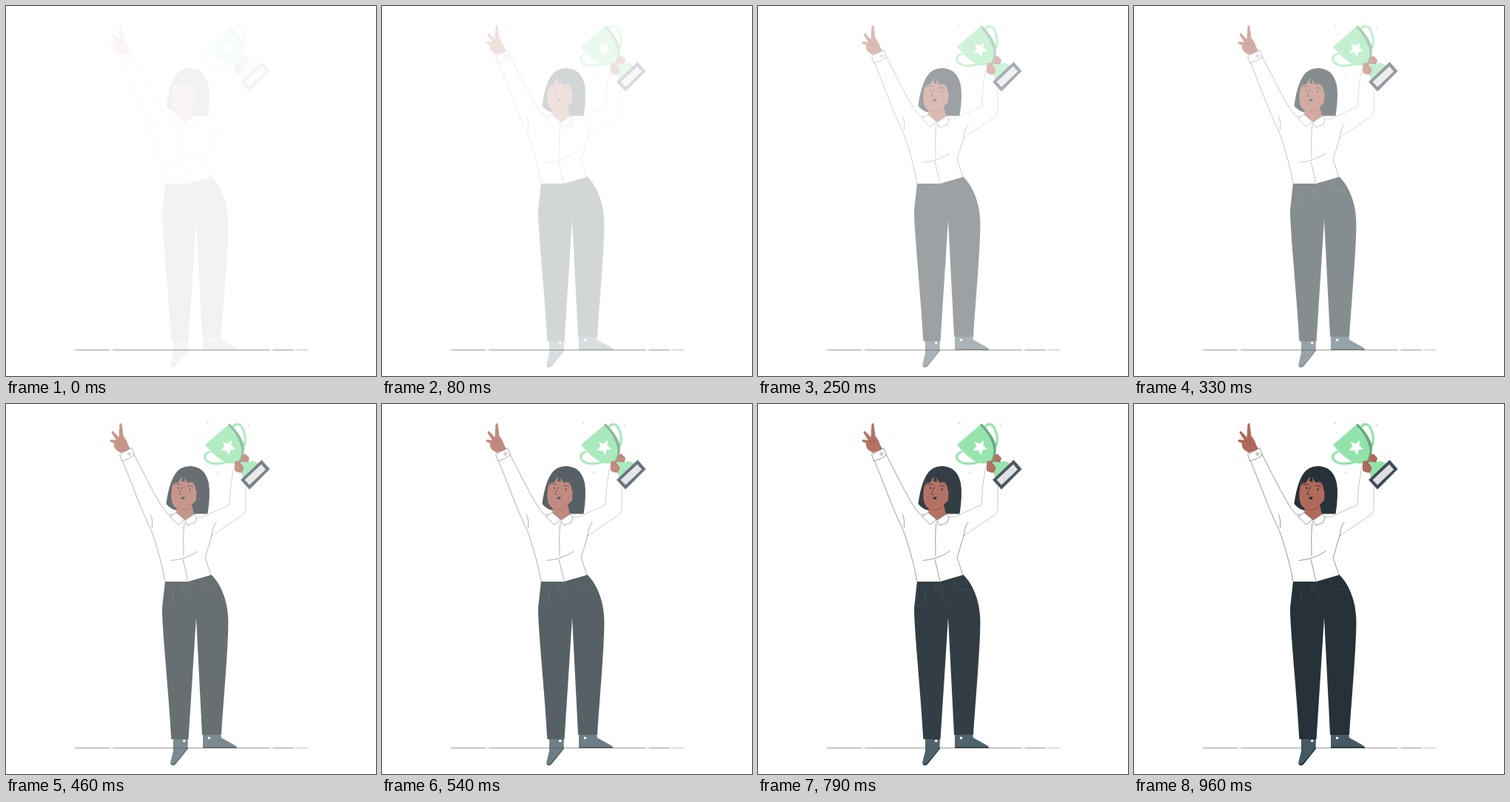
Animation, 500 px wide and 500 px high, one loop 1040 ms. Source, as an HTML page:

```html
<!DOCTYPE html>
<html lang="en">
<head>
<meta charset="utf-8">
<title>Winner with trophy</title>
<style>
  html, body { margin: 0; width: 100%; height: 100%; overflow: hidden; background: #fff; }
  svg { display: block; width: 100vw; height: 100vh; }
  .ink { fill: #263238; }
  .skin { fill: #b0695a; }
  .shade { fill: #94513f; }
  .shoe { fill: #455a64; }
  .mint { fill: #92e3a9; }
  .white { fill: #fff; }
  .line { fill: none; stroke: #263238; stroke-width: .5; stroke-linecap: round; stroke-linejoin: round; }
  .thin { stroke-width: .3; }
  .filled { fill: #fff; }
  .seam { fill: none; stroke: #455a64; stroke-width: .6; }
  .handle { fill: none; stroke: #92e3a9; stroke-width: 3.3; stroke-linecap: round; }
</style>
</head>
<body>
<svg viewBox="0 0 500 500">
  <path fill="#a8a8a8" d="M90 464.800 96 464.200H140.500V465.400H96ZM141 464.800 147 464.200H357V465.400H147ZM358.500 464.700 362 464.200H388L391 464.700 388 465.400H362ZM392 464.500H408V465.200H392Z"/>
  <g id="figure">
    <!-- shoes -->
    <path class="shoe" d="M226 451H246L245.500 465 241 472 228 487Q224 490 222 485L226 469Z"/>
    <path class="ink" d="M245.800 463V466L229 487Q225 490 222 486.500Q226 487 229 484L241 470Z"/>
    <path class="line" d="M228 467 232 468M227 472 231 473M226 477 229 478"/>
    <path class="shoe" d="M266 446H290L291 451 309 461Q312 463 312.500 465H266Z"/>
    <path class="ink" d="M266 463.200H311L312.500 465H266Z"/>
    <path class="line" d="M289 453 286 456M294 455 291 458M298 458 295 460"/>
    <circle class="white" cx="240.700" cy="455.300" r="1.700"/>
    <circle class="white" cx="274.500" cy="451.300" r="1.700"/>

    <!-- trousers -->
    <path class="ink" d="M215 239.500H246L277 230.500C289 241 299.500 264 300.300 290C301 322 294 400 291 447H265L257 289 246.500 453H223.500C220 390 211 304 211 276Z"/>
    <path class="seam" d="M227 250Q228 268 215 272M264 238Q271 250 284 252"/>
    <path class="seam" stroke-dasharray="2 1.500" d="M246 241Q249 258 253.500 272"/>
    <circle class="seam" cx="241" cy="247.500" r="2.800"/>

    <!-- raised hand -->
    <path class="skin" d="M155 66 149 62Q145 58 146 53L141 51Q139.500 48.500 142.500 48L149 49 143 39.500Q142 36 145 37L152.500 45 153.500 28Q154.500 24.500 156.500 27L158.500 43Q164 50 164.500 54L168 61Z"/>
    <path class="line" stroke-opacity=".5" d="M149 49 155 53M155 47Q158 50 157 53"/>

    <!-- shirt -->
    <path class="white" d="M154 69 172 60 190 99 218 148 230 147 243 157 258 153 302 136 308 82 324 93V140Q324 148 318 151L278 178 269 208 277 231 246 240H215C211 216 202 186 196 170C182 142 171 106 154 69Z"/>
    <path class="line" d="M215 240C211 216 202 186 196 170C182 142 169 104 157 76M172 66 190 101Q208 137 217 147Q220 151 224 150M278 178 269 208 277 231M278 178Q279 166 284 160M196 150Q199 158 197.500 167"/>
    <path class="line thin" d="M258 153 265 153 302 136 304 108 308 84M324 108V140Q324 148 318 151L278 178"/>
    <path class="line" d="M241 160C239 178 240 190 240 205M239 210 246 239M223 211.500Q243 210 259 199"/>
    <path class="line filled" d="M154 68 170 59.500 173.500 69Q166 75 157 77Z"/>
    <circle class="line" cx="166.700" cy="67.500" r="1.700"/>

    <!-- hair, neck and collar -->
    <path class="ink" d="M216.500 135C218.500 120 222 104 229 94Q236 84 248 84C263 84 271 93 274 107Q276.500 123 272.500 148.500H249L231 144Q222 142 216.500 135Z"/>
    <path class="skin" d="M231 139 251 136 254 149 242 157 230 147Z"/>
    <path class="line filled" d="M222 152 230 146.500 241 156 233 163ZM242 157 254 149 258 153 256 160 246 164Z"/>

    <!-- face -->
    <path class="skin" d="M226 105Q222 121 224 131Q226 141 236 143Q246 143 254 133Q259 130 258.500 121Q258 116 256 116L257 98 233 96Z"/>
    <path class="shade" d="M231 142Q243 144 250 138.500Q244 146.500 231 142Z"/>
    <path class="ink" d="M225.500 111Q226 97 238 90Q258 89 260 111Q261 124 257 130L257.500 116 252.500 104 252.500 108 249 104 249 106.500Q244 107 241 99L241.500 106 237 104 238 97 232 107 229.500 106Z"/>
    <path class="line" style="stroke-width:.8" d="M229.500 109.500Q232 107 236 108.500M245.500 110.500Q249 109 252.500 112M238.500 112 234 121.500 237.500 122.500"/>
    <circle class="ink" cx="233" cy="113.600" r="1.200"/>
    <circle class="ink" cx="248.300" cy="115.500" r="1.200"/>
    <path class="ink" d="M236 127Q239 124 242 126.500Q241 129.500 237.500 129Z"/>

    <!-- trophy -->
    <path class="handle" d="M275 65Q267 67 269 74Q275 84.500 299 78.500M306 32Q312 24 318 30Q326 43 322 56"/>
    <path class="mint" d="M269 55 301.500 27Q318 42 321 55Q323 68 317.500 78Q309 82 298 79.500Q283 73 269 55Z"/>
    <path fill="#67a47c" d="M300 28 302.500 26.500Q318 42 321.500 55Q323 68 317.500 78L313 79.500Q320 69 318 59Q315 44 300 28Z"/>
    <path id="star" class="white"/>
    <path class="skin" d="M309 82 310 77 318 77 319 70 323 67 326 70Q330 72 328 76L327 84 320 92Q314 94 309 90Z"/>
    <path class="mint" d="M316 80 322 76Q325 81 332 77Q339 78 341 82L322 101Q317 95 320 90Q323 84 316 80Z"/>
    <path class="skin" d="M309 80 315 78 321 87 319 93 310 90ZM318 72 325 68.500 329 74 326 78 320 78Z"/>
    <path class="line" stroke-opacity=".5" d="M315 79 321 87M320 78 326 78"/>
    <path fill="#3e4c58" d="M317 102.500 345.500 75.500 356.500 88 329 115.500Z"/>
    <path fill="#e0e0e0" d="M322.500 102.500 345 81.500 351 88.500 329 109.500Z"/>
    <g id="dots" fill="#dedede"></g>
  </g>
</svg>
<script>
  const LOOP = 1040, FPS = 24, STEPS = 23;
  const $ = id => document.getElementById(id);

  // five-pointed star, tilted with the cup
  const star = Array.from({ length: 10 }, (_, i) => {
    const r = i % 2 ? 5 : 10.5, a = (i * 36 - 133) * Math.PI / 180;
    return `${(300 + r * Math.cos(a)).toFixed(2)} ${(58.5 + r * Math.sin(a)).toFixed(2)}`;
  });
  $('star').setAttribute('d', `M${star.join('L')}Z`);

  // sparkles: x, y, radius
  $('dots').innerHTML = [
    [272, 25.5, 1.5], [328, 29, 1.6], [275, 38.5, 1], [286, 92.5, 1.5], [264, 33, .6]
  ].map(([x, y, r]) => `<circle cx="${x}" cy="${y}" r="${r}"/>`).join('');

  // stepped fade with a quadratic ease-out
  const startOf = k => k ? Math.round((k + 1) * 100 / FPS) * 10 : 0;
  const fade = t => t >= 960 ? 1 : 1 - (0.97 - 0.00092 * t) ** 2;
  const frames = Array.from({ length: STEPS }, (_, k) => {
    const t = startOf(k);
    return { offset: t / LOOP, opacity: fade(t), easing: 'step-end' };
  });
  frames.push({ offset: 1, opacity: 1 });
  $('figure').animate(frames, { duration: LOOP, iterations: Infinity });
</script>
</body>
</html>
```
